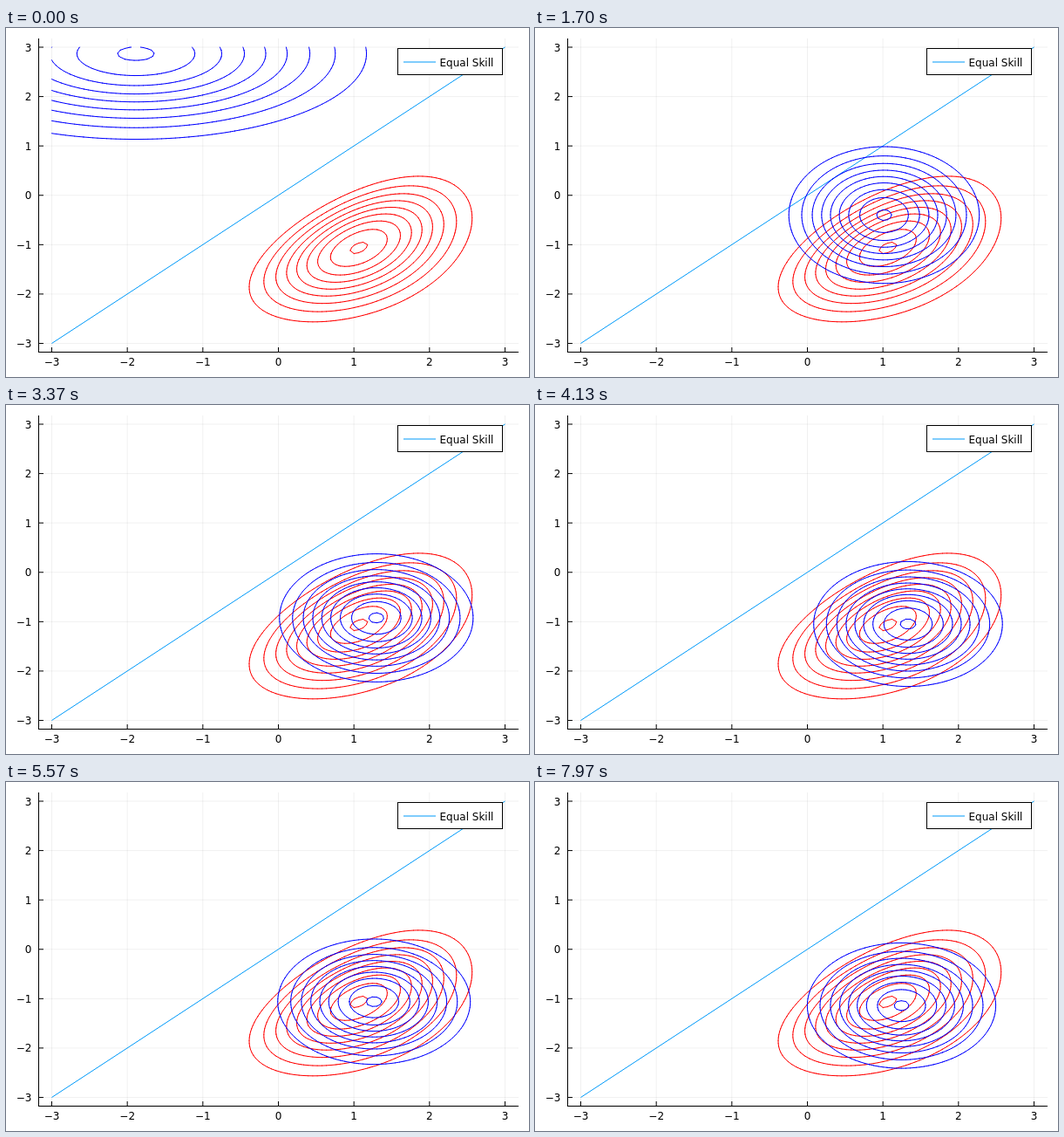
An HTML page with a canvas that plays this animation: 600x400 px, repeating every 8000 ms.

```html
<!DOCTYPE html>
<html lang="en">
<head>
<meta charset="utf-8">
<title>Equal Skill</title>
<style>
  html, body { margin: 0; width: 100%; height: 100%; overflow: hidden; background: #fff; }
  canvas { display: block; }
</style>
</head>
<body>
<canvas id="plot" width="600" height="400"></canvas>
<script>
const ctx = document.getElementById('plot').getContext('2d');
const LOOP = 8000, STEP = 100 / 3;
const SX = 86.667, SY = 56.58, X0 = 312.5, Y0 = 191.75;
const px = x => X0 + SX * x;
const py = y => Y0 - SY * y;

const N = 100;
const axis = Array.from({ length: N }, (_, i) => -3 + 6 * i / (N - 1));
const LEVELS = [0.2, 0.3, 0.4, 0.5, 0.6, 0.7, 0.8, 0.9, 0.99];
const OUTER = Math.sqrt(-2 * Math.log(LEVELS[0]));   // outer ring radius in sigmas

// time, then centre x, centre y, radius x, radius y of the outer ring in pixels
const KEYS = [
  [0, 149, 29.5, 264.5, 98],
  [200, 214, 73.7, 215, 95.7],
  [415, 267, 111, 182, 93],
  [830, 335.3, 162.5, 149.1, 88.5],
  [1250, 374.7, 194, 124.5, 83],
  [1670, 399.5, 213.5, 109.5, 78.5],
  [2500, 417.5, 231.8, 110.5, 76.3],
  [2630, 420, 234, 108.5, 75.3],
  [3330, 424.5, 243.5, 111, 73.5],
  [3700, 428.5, 248.5, 110, 72],
  [4130, 428, 251, 108.2, 71.5],
  [4600, 426, 251.7, 110, 74.5],
  [5000, 424.2, 252, 110, 74],
  [5570, 422.2, 251.8, 110.4, 71.8],
  [6100, 420.7, 253.3, 111.5, 75.5],
  [6570, 419.7, 252.7, 110.4, 75.6],
  [7100, 418.5, 253.7, 111, 75.3],
  [7500, 418.5, 254.5, 111, 74.5],
  [7970, 420.5, 256.3, 108, 71.8]
];

function slope(i, c) {
  const a = KEYS[Math.max(i - 1, 0)], b = KEYS[Math.min(i + 1, KEYS.length - 1)];
  return (b[c] - a[c]) / (b[0] - a[0]);
}

// Cubic Hermite interpolation of one key column
function valueAt(t, c) {
  let i = 0;
  while (i < KEYS.length - 2 && KEYS[i + 1][0] <= t) i++;
  const a = KEYS[i], b = KEYS[i + 1], h = b[0] - a[0];
  const s = Math.min((t - a[0]) / h, 1), r = 1 - s;
  return r * r * (1 + 2 * s) * a[c] + s * s * (3 - 2 * s) * b[c]
    + h * s * r * (r * slope(i, c) - s * slope(i + 1, c));
}

// Marching squares over the grid, heights scaled to a maximum of 1
function contours(density) {
  const z = axis.map(y => axis.map(x => density(x, y)));
  const top = Math.max(...z.map(row => Math.max(...row)));
  const path = new Path2D();
  for (let j = 0; j < N - 1; j++) {
    for (let i = 0; i < N - 1; i++) {
      const corners = [[i, j], [i + 1, j], [i + 1, j + 1], [i, j + 1]]
        .map(([a, b]) => [px(axis[a]), py(axis[b]), z[b][a] / top]);
      const heights = corners.map(p => p[2]);
      const low = Math.min(...heights), high = Math.max(...heights);
      for (const level of LEVELS) {
        if (low >= level || high < level) continue;
        const cuts = [];
        corners.forEach((p, k) => {
          const q = corners[(k + 1) % 4];
          if ((p[2] < level) === (q[2] < level)) return;
          const f = (level - p[2]) / (q[2] - p[2]);
          cuts.push([p[0] + f * (q[0] - p[0]), p[1] + f * (q[1] - p[1])]);
        });
        path.moveTo(...cuts[0]);
        path.lineTo(...cuts[1]);
      }
    }
  }
  return path;
}

// Posterior of two skills after ten wins by the first player
const posterior = contours((a, b) =>
  Math.exp(-(a * a + b * b) / 2) / (1 + Math.exp(b - a)) ** 10);

function approximation(t) {
  const [cx, cy, rx, ry] = [1, 2, 3, 4].map(c => valueAt(t, c));
  const mx = (cx - X0) / SX, my = (Y0 - cy) / SY;
  const sx = rx / SX / OUTER, sy = ry / SY / OUTER;
  return contours((x, y) =>
    Math.exp(-(((x - mx) / sx) ** 2 + ((y - my) / sy) ** 2) / 2));
}

function line(x1, y1, x2, y2, color) {
  ctx.strokeStyle = color;
  ctx.beginPath();
  ctx.moveTo(x1, y1);
  ctx.lineTo(x2, y2);
  ctx.stroke();
}

function text(label, x, y, align) {
  ctx.textAlign = align;
  ctx.fillStyle = '#000';
  ctx.fillText(label, x, y);
}

function drawAxes() {
  const grid = 'rgba(0,0,0,0.06)';
  for (let v = -3; v <= 3; v++) {
    const x = px(v), y = py(v), label = String(v).replace('-', '\u2212');
    line(x, 12, x, 371.5, grid);
    line(37.5, y, 588, y, grid);
    line(x, 371.5, x, 366, '#000');
    line(37.5, y, 43, y, '#000');
    text(label, x, 387, 'center');
    text(label, 29.5, y + 4.5, 'right');
  }
  line(37.5, 12, 37.5, 372, '#000');
  line(37, 371.5, 588, 371.5, '#000');
}

function drawLegend() {
  ctx.fillStyle = '#fff';
  ctx.fillRect(449.5, 24, 120.5, 29.5);
  ctx.strokeStyle = '#000';
  ctx.strokeRect(449.5, 23.5, 120, 30);
  line(456, 39, 493, 39, '#009afa');
  text('Equal Skill', 497.5, 43.5, 'left');
}

function draw(t) {
  ctx.fillStyle = '#fff';
  ctx.fillRect(0, 0, 600, 400);
  ctx.font = '12px "DejaVu Sans", sans-serif';
  ctx.lineWidth = 1;
  ctx.lineCap = 'butt';
  drawAxes();
  line(px(-3), py(-3), px(3), py(3), '#009afa');
  ctx.lineCap = 'round';
  ctx.strokeStyle = '#f00';
  ctx.stroke(posterior);
  ctx.strokeStyle = '#00f';
  ctx.stroke(approximation(t));
  ctx.lineCap = 'butt';
  drawLegend();
}

const start = performance.now();
let shown = -1;
function tick() {
  const t = (performance.now() - start) % LOOP;
  const step = Math.floor((t + 4) / STEP) % (LOOP / STEP);
  if (step !== shown) draw(step * STEP);
  shown = step;
  requestAnimationFrame(tick);
}
tick();
</script>
</body>
</html>
```
